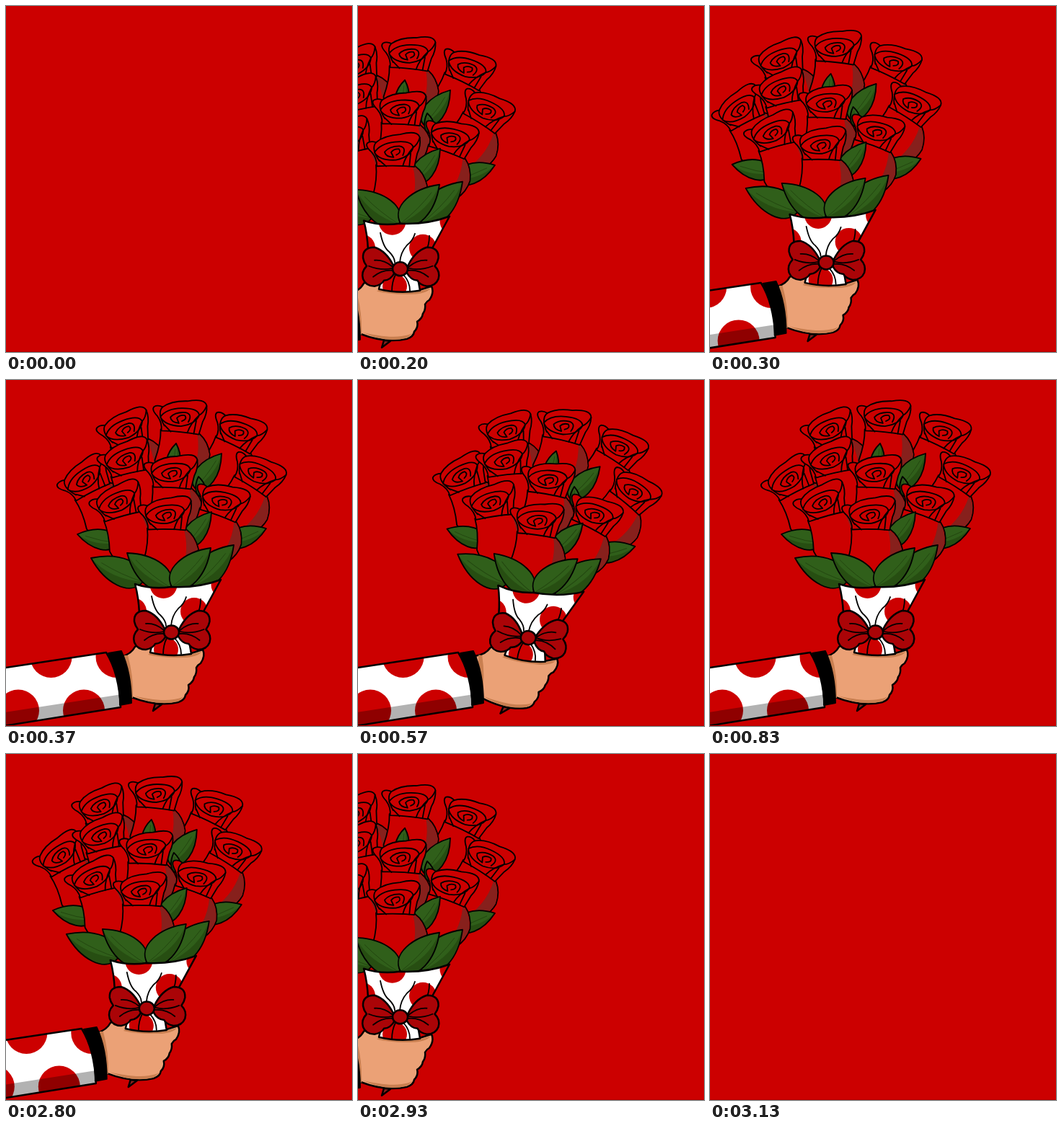
Write an HTML page that moves like this. It is 480x480 px and loops after 3.16 s.

```html
<!DOCTYPE html>
<html lang="en">
<head>
<meta charset="utf-8">
<title>Rose bouquet</title>
<style>
  html, body { margin: 0; width: 100%; height: 100%; overflow: hidden; background: #c00; }
  svg { display: block; width: 100vw; height: 100vh; }
  .ink { stroke: #000; stroke-width: 1.8; stroke-linejoin: round; stroke-linecap: round; }
  .bold { stroke-width: 2.5; }
  .red { fill: #c00; }
  .line { fill: none; }
  .shade { fill: #87201c; }
  .skin { fill: #eba176; }
  .skinShade { fill: #c97f50; }
  .leaf { fill: #305f1a; }
  .leafShade { fill: #274e12; }
  .vein { fill: none; stroke: #234710; stroke-width: 1; }
  .bow { fill: #aa0407; }
  .white { fill: #fff; }
  #leaf path { vector-effect: non-scaling-stroke; }
</style>
</head>
<body>
<svg viewBox="0 0 480 480">
  <defs>
    <g id="rose">
      <path class="ink red" d="M-26 15Q-25 34-33 58Q-30 85 0 97Q42 80 43 48Q40 30 28 20Z"/>
      <path class="shade" d="M25 21Q37 26 42 48Q41 74 10 92Q32 58 25 21Z"/>
      <path class="ink red" d="M-25 17Q-24 6-31-3Q-40-12-36-16Q-31-19-24-16Q-12-25 10-25Q35-30 37-19Q38-8 32 3L27 21Q2 17-25 17Z"/>
      <path class="ink line" d="M-24-16Q-32-8-21 10M-27-2Q-19-14 2-15Q25-16 27-6Q22 7 2 10Q-20 10-27-2M37-19Q33-9 27-6"/>
      <path class="ink line" d="M-1 6L-4-1Q0-6 7-5Q11 0 3 3M-1 6Q-12 5-13-2Q-6-10 8-9Q18-7 12 4M-21 9L-12 18M27-6Q15 6 11 19M23 2L20 20"/>
    </g>
    <g id="leaf">
      <path class="leaf" d="M0 0C.1-.34.6-.3 1 0C.6.3.1.34 0 0Z"/>
      <path class="leafShade" d="M0 0Q.55.2 1 0C.6.3.1.34 0 0Z"/>
      <path class="vein" d="M0 0Q.4.05.8 0"/>
      <path class="ink line" d="M0 0C.1-.34.6-.3 1 0C.6.3.1.34 0 0Z"/>
    </g>
    <clipPath id="wrapClip"><path id="wrapShape" d="M179 283Q203 291 229 287Q266 289 298 277L273 323L252 350L257 380Q228 385 200 378L206 352L185 324Q184 302 179 283Z"/></clipPath>
    <clipPath id="sleeveClip"><path id="sleeveShape" d="M-60 408L139 378Q157 407 159 454L-60 489Z"/></clipPath>
  </defs>
  <rect width="480" height="480" fill="#c00"/>
  <g id="scene">
    <g id="bouquet">
      <g id="flowers"></g>
      <path class="ink bold shade" d="M204 459L207 449L216 450Z"/>
      <path class="ink bold skin" d="M160 384Q174 380 179 370Q187 364 199 371L257 379L273 374Q277 383 270 393Q266 395 264 399Q265 407 261 412Q260 419 253 423Q255 431 249 437Q248 444 239 447Q210 454 174 440Z"/>
      <path class="skinShade" d="M164 382H169Q177 410 176 441L170 440ZM200 379Q228 385 257 381L271 377Q268 383 250 385Q215 386 197 381ZM248 438Q240 444 215 444Q192 442 178 438Q208 453 239 446Z"/>
      <g clip-path="url(#wrapClip)">
        <use href="#wrapShape" class="white"/>
        <g id="wrapDots" class="red"><circle cx="222" cy="374" r="17"/></g>
      </g>
      <use href="#wrapShape" class="ink bold line"/>
      <path class="ink line" d="M202 300Q206 320 214 326Q222 334 222 341M250 301Q247 311 239 317Q230 327 229 341M223 358Q218 368 218 381M234 358Q243 368 243 380M270 304Q270 316 265 327"/>
      <g class="ink bow">
        <g id="loop">
          <path class="bold" d="M220 345Q210 325 194 320Q177 320 178 335Q179 341 183 346Q175 354 178 364Q182 374 194 374Q204 372 207 366Q216 366 222 355Z"/>
          <path class="line" d="M186 346Q204 353 219 349M194 338Q207 337 219 347M192 361Q204 351 219 352"/>
        </g>
        <use href="#loop" transform="matrix(-1 0 0 1 460.5 0)"/>
        <ellipse class="bold" cx="229.5" cy="350" rx="10.5" ry="9.5"/>
      </g>
    </g>
    <g clip-path="url(#sleeveClip)">
      <use href="#sleeveShape" class="white"/>
      <g id="sleeveDots" class="red"></g>
      <path d="M-60 470L160 436V490H-60Z" opacity=".3"/>
    </g>
    <use href="#sleeveShape" class="ink bold line"/>
    <path class="ink" d="M142 379L160 376Q174 406 174 448L158 451Q158 410 142 379Z"/>
  </g>
  <rect y="479" width="480" height="1" fill="#b00000"/>
</svg>
<script>
const $ = id => document.getElementById(id);

// Roses fan out: the further from the middle, the more they lean.
const rose = (x, y) =>
  `<use href="#rose" transform="translate(${x} ${y}) rotate(${(x - 235) / 4})"/>`;

// A leaf runs from base to tip, mirrored so that its dark edge faces down.
function leaf(x, y, tipX, tipY) {
  const dx = tipX - x, dy = tipY - y, size = Math.hypot(dx, dy);
  const angle = Math.atan2(dy, dx) * 180 / Math.PI;
  return `<use href="#leaf" transform="translate(${x} ${y}) rotate(${angle})
    scale(${size} ${dx < 0 ? -size : size})"/>`;
}

// Four polka dots in a zigzag between two rows.
const dots = (x, gap, evenY, oddY, r) => [0, 1, 2, 3].map(i =>
  `<circle cx="${x + gap * i}" cy="${i % 2 ? oddY : evenY}" r="${r}"/>`).join('');

// Back to front.
$('flowers').innerHTML = [
  rose(321, 73), rose(165, 71), rose(241, 54),
  leaf(230, 126, 236, 88), leaf(262, 150, 299, 102), leaf(156, 160, 133, 140),
  rose(347, 131), rose(110, 140), rose(166, 112),
  leaf(272, 162, 267, 134),
  rose(229, 131),
  leaf(306, 226, 361, 206),
  rose(298, 170),
  leaf(155, 226, 99, 214), leaf(248, 230, 285, 183),
  rose(155, 172),
  leaf(190, 280, 118, 247), leaf(260, 286, 316, 229),
  rose(221, 189),
  leaf(228, 288, 168, 240), leaf(230, 287, 284, 233)
].join('');
$('wrapDots').innerHTML += dots(176, 42.5, 321, 284, 19);
$('sleeveDots').innerHTML = dots(17, 45.5, 458.5, 384, 29);

const LOOP = 3160, FPS = 30;
const ENTERED = 11, SWING_PEAK = 18, SWING_HALF = 7, LEAVE = 83, GONE = 94;

function draw(now) {
  const step = Math.floor((now % LOOP + 4) * FPS / 1000);
  const away = Math.max(ENTERED - step, step - LEAVE, 0);
  const swing = 8.25 * Math.max(0, 1 - Math.abs(step - SWING_PEAK) / SWING_HALF);
  $('scene').style.display = step < 1 || step >= GONE ? 'none' : '';
  $('scene').setAttribute('transform', `translate(${-34.2 * away} ${2.95 * away})`);
  $('bouquet').setAttribute('transform', `rotate(${swing} 171 408)`);
}

const start = performance.now();
function tick() {
  draw(performance.now() - start);
  requestAnimationFrame(tick);
}
tick();
</script>
</body>
</html>
```
